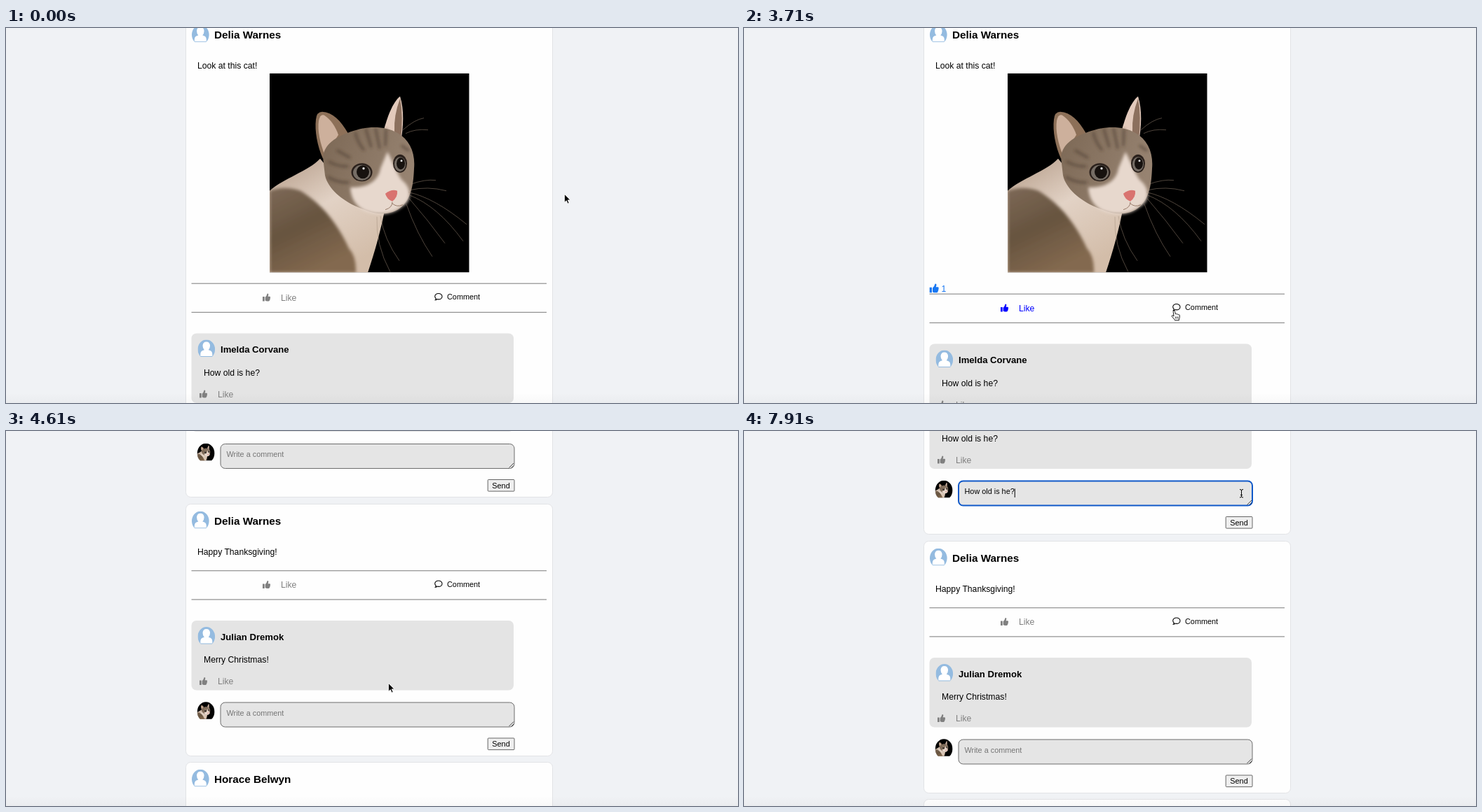
Write an HTML page that moves like this. It is 1044x536 px and loops after 8000 ms.

```html
<!DOCTYPE html>
<html lang="en">
<head>
<meta charset="utf-8">
<title>Post feed</title>
<style>
  html, body { margin: 0; width: 100%; height: 100%; overflow: hidden; background: #f0f2f5; }
  svg { display: block; font: 12.2px "Liberation Sans", Arial, sans-serif; }
  .card { fill: #fefefe; stroke: #e2e3e6; }
  .title { font-size: 15.26px; font-weight: bold; }
  .author { font-size: 13.1px; font-weight: bold; }
  .small { font-size: 10.87px; }
  .muted { fill: #808080; }
  .hint { fill: #757575; }
  .rule { fill: #8f8f8f; }
  .field { fill: #e5e5e5; stroke: #6c6c6c; }
  .line { fill: none; stroke: #000; }
  .liked { fill: #00f; }
  text { white-space: pre; }
</style>
</head>
<body>
<svg width="1044" height="536" viewBox="0 0 1044 536">
  <defs>
    <linearGradient id="shade" x2="0" y2="1">
      <stop stop-opacity="0"/><stop offset="1" stop-opacity=".025"/>
    </linearGradient>
    <linearGradient id="coat" x2=".5" y2="1">
      <stop stop-color="#7d6957"/><stop offset=".5" stop-color="#67543f"/><stop offset="1" stop-color="#83694f"/>
    </linearGradient>
    <linearGradient id="chest" x2=".6" y2="1">
      <stop stop-color="#b39a86"/><stop offset=".5" stop-color="#e2d2c5"/><stop offset="1" stop-color="#d3bda9"/>
    </linearGradient>
    <linearGradient id="face" x2="1" y2=".4">
      <stop stop-color="#7c6855"/><stop offset="1" stop-color="#978371"/>
    </linearGradient>
    <filter id="soft"><feGaussianBlur stdDeviation="2"/></filter>
    <clipPath id="frame"><path d="M0 0H284.5V284.5H0Z"/></clipPath>
    <clipPath id="round"><path d="M4.2 24.5A12.3 14 0 1 1 20.4 24.5Z"/></clipPath>

    <g id="cat" clip-path="url(#frame)">
      <path d="M0 0H285V285H0Z"/>
      <path fill="url(#chest)" d="M0 168C20 150 55 140 72 122L95 150L165 190C160 220 150 255 140 285H0Z"/>
      <path fill="url(#coat)" d="M0 168Q22 160 44 168C80 190 100 222 113 250Q124 262 123 285H0Z" filter="url(#soft)"/>
      <path fill="#8d7058" d="M76 122C68 104 64 82 66 66Q67 55 75 55C90 56 101 67 112 86Z"/>
      <path fill="#cdb09c" d="M79 118C72 100 68 82 70 68Q72 58 78 60C87 66 94 76 98 88Z"/>
      <path fill="#e3cabc" d="M162 84C168 62 175 42 186 33C192 52 191 76 187 98Z"/>
      <path fill="#8c705e" d="M178 83Q177 60 186 36Q191 60 187 95Z"/>
      <path fill="url(#face)" d="M76 120C78 99 99 88 124 81C144 75 166 76 182 85C200 95 208 114 206 136C205 158 203 176 189 190C174 204 152 202 138 196C110 187 84 168 79 146Z"/>
      <g filter="url(#soft)">
        <path fill="#e7d8cd" d="M168 112C177 129 182 145 189 153C204 165 202 184 189 190C174 204 150 203 134 196Q116 185 115 163C138 164 155 155 158 136Z"/>
        <path fill="none" stroke="#46362a" stroke-width="3" opacity=".65" d="M122 84Q125 99 135 110M137 79L145 106M151 78L157 108M166 79L165 104M84 126Q98 134 112 133M83 148Q97 157 113 156M96 110L115 121M188 103L199 111"/>
      </g>
      <ellipse cx="131.5" cy="141.5" rx="15" ry="13" fill="#2b211c"/>
      <ellipse cx="131.5" cy="142" rx="12.5" ry="11" fill="#766e66"/>
      <ellipse cx="133" cy="141" rx="9" ry="9.5" fill="#17120f"/>
      <ellipse cx="186" cy="129" rx="10" ry="13" fill="#2b211c"/>
      <ellipse cx="186" cy="130" rx="8" ry="10.5" fill="#766e66"/>
      <ellipse cx="187" cy="129" rx="6" ry="8.5" fill="#17120f"/>
      <circle cx="134" cy="136" r="1.7" fill="#ddd"/><circle cx="188" cy="125" r="1.5" fill="#ddd"/>
      <path fill="#d9736f" d="M165 172Q174 165 182 168Q183 177 175 183Q167 180 165 172Z"/>
      <path fill="none" stroke="#967a69" d="M175 184Q175 192 165 195M175 186Q181 192 190 188"/>
      <path fill="none" stroke="#a08b79" stroke-width=".7" opacity=".7" d="M198 170Q235 178 281 216M199 174Q240 190 276 240M199 179Q226 210 250 243M195 187Q210 230 232 262M200 167Q225 161 252 168M153 205Q151 245 172 284M158 204Q163 237 185 268M190 81Q207 66 220 64M194 86Q208 79 226 81M200 159Q222 151 237 153"/>
    </g>

    <g id="user" clip-path="url(#round)">
      <path fill="#94bbe0" d="M0 0H25V25H0Z"/>
      <path fill="#fff" d="M3.8 23.6V20.5Q4 15.6 9.3 14.8Q7 12.3 7 8.6Q7.3 3 12.3 3T17.6 8.6Q17.6 12.3 15.3 14.8Q20.6 15.6 20.8 20.5V23.6Z"/>
    </g>
    <g id="me" clip-path="url(#round)"><use href="#cat" transform="translate(-.8 -.3) scale(.093)"/></g>
    <path id="thumb" d="M0 5H3V12H0ZM4 5.6Q6.4 3.8 6.8 1.2Q7 0 8 .1Q9.4 .4 9 2.3L8.3 4.5H11Q12.2 4.7 12 6Q11.8 9.2 10.6 11.2Q10.2 12 9.2 12H7Q5.5 12 4 10.9Z"/>
    <path id="bubble" class="line" stroke-width="1.1" d="M1.4 10Q2.4 9 2.3 8Q.7 6.7 .7 5C.7 2.5 3 .8 5.8 .8S11 2.5 11 5S8.7 9.2 5.8 9.2Q4.9 9.2 4.1 8.9Q3 9.9 1.4 10Z"/>

    <path id="arrow" stroke="#fff" stroke-width=".8" d="M0 0V11.7L2.7 9.2L4.7 13.6L6.6 12.7L4.7 8.4H8.3Z"/>
    <g id="hand" stroke="#000" stroke-width=".9" stroke-linejoin="round">
      <path fill="#fff" d="M3.7 8.6L2.9 2Q2.9 .6 4 .6Q5.2 .6 5.4 2L6 5.3Q7.2 4.5 8 5.6Q9.3 5 10 6.2Q11.7 5.8 12 7.2V9.8Q12 11.2 11.1 12.6V14.3H5.2Q4.7 12.8 3.3 11.5L.9 8.8Q.4 7.8 1.4 7.4Q2.5 7.2 3.7 8.6Z"/>
      <path d="M6.2 9V12M8 9V12M9.8 9V12" stroke-width=".7"/>
    </g>
    <path id="beam" class="line" d="M1 .5Q3.5 .5 3.5 2Q3.5 .5 6 .5M3.5 2V11M1 12Q3.5 12 3.5 10.5Q3.5 12 6 12M2 8.5H5"/>
  </defs>

  <g id="page"></g>
  <rect y="522" width="1044" height="14" fill="url(#shade)"/>
  <use id="cursor"/>
</svg>
<script>
const $ = id => document.getElementById(id);
const text = (x, y, str, cls = '', attrs = '') => `<text x="${x}" y="${y}" class="${cls}" ${attrs}>${str}</text>`;
const use = (id, x, y, scale = 1) => `<use href="#${id}" transform="translate(${x} ${y}) scale(${scale})"/>`;
const rect = (x, y, w, h, attrs) => `<rect x="${x}" y="${y}" width="${w}" height="${h}" ${attrs}/>`;

const card = (y, h) => rect(256.5, y + .5, 523, h, 'rx="7" class="card"');
const header = (y, name, message) =>
  use('user', 265, y + 10.7) + text(297, y + 30, name, 'title') + text(273, y + 73, message);

// Everything from the first rule of a post down to its Send button
function actions(y, author, comment, id = '') {
  const box = y + 72.5, rule = dy => rect(264.5, y + dy, 506.5, 1.2, 'class="rule"');
  return rule(.6) + rule(41.8) +
    `<g class="muted" id="${id}like">${use('thumb', 366, y + 15.5, .92)}${text(392, y + 25.5, 'Like')}</g>` +
    use('bubble', 611, y + 14.7) + text(629, y + 24.3, 'Comment', 'small') +
    rect(264.5, box, 459.5, 99.5, 'rx="7" fill="#e4e4e4"') +
    use('user', 273.5, box + 9) + text(306, box + 27.6, author, 'author') + text(282, box + 60.3, comment) +
    `<g class="muted">${use('thumb', 276, box + 81, .92)}${text(302, box + 91.2, 'Like')}</g>` +
    use('me', 272.8, box + 116.3) +
    rect(306, box + 117, 419, 35, `rx="6.5" class="field" id="${id}field"`) +
    `<path class="line" stroke-width=".7" d="M717.5 ${box + 151}l6.5-6.5M721 ${box + 151}l3-3"/>` +
    text(314.5, box + 135.6, 'Write a comment', 'small hint', `id="${id}entry"`) +
    rect(687.2, box + 168, 37.8, 16.6, 'rx="1" fill="#efefef" stroke="#666"') +
    text(706, box + 180.3, 'Send', 'small', 'text-anchor="middle"');
}

$('page').innerHTML =
  card(-15, 659) + header(-15, 'Delia Warnes', 'Look at this cat!') + use('cat', 376, 64.7) +
  `<g id="count" fill="#1877f2">${use('thumb', 264.7, 365.4, 1.08)}${text(281.5, 376.7, '1')}</g>` +
  `<g id="below">` +
    actions(364, 'Imelda Corvane', 'How old is he?', 'my-') +
    rect(314.5, 564.5, 1, 12.4, 'id="caret"') +
    card(639, 360) + header(639, 'Delia Warnes', 'Happy Thanksgiving!') +
    actions(733.5, 'Julian Dremok', 'Merry Christmas!') +
    card(1008, 360) + header(1008, 'Horace Belwyn', '') +
  `</g>`;

// Keys: tick, values..., the cursor shape last
const scrollKeys = [[0, 0], [27, 0], [28, 32], [29, 167], [30, 400], [31, 550], [33, 550], [36, 497]];
const cursorKeys = [
  [0, 796.5, 237.5, 'arrow'], [2, 796.5, 237.5, 'arrow'], [6, 570, 325, 'arrow'], [10, 398, 380, 'hand'],
  [13, 391.7, 386, 'hand'], [18, 391.7, 386, 'hand'], [19, 400, 392, 'arrow'], [22, 546, 430, 'arrow'],
  [23, 546, 430, 'arrow'], [25, 609.3, 403.5, 'hand'], [26, 628, 394, 'hand'], [30, 628, 394, 'hand'],
  [31, 545.5, 360.5, 'arrow'], [34, 545.5, 360.5, 'arrow'], [37, 513, 92.5, 'beam'], [50, 513, 92.5, 'beam'],
  [53, 706, 83, 'beam']
];

function at(keys, k) {
  const i = keys.findLastIndex(key => key[0] <= k), a = keys[i], b = keys[i + 1] || a;
  const u = a === b ? 0 : (k - a[0]) / (b[0] - a[0]);
  return a.slice(1).map((v, j) => typeof v === 'string' ? v : v + (b[j + 1] - v) * u);
}

const phrase = 'How old is he?';
const typedAt = k => k < 41 ? 0 : k < 48 ? Math.floor(1 + (k - 41) * 10 / 6 + .01) : k < 51 ? Math.min(13, k - 36) : 14;

function draw() {
  const t = performance.now() % 8000;
  const k = Math.floor(t < 2600 ? t / 147.6 : (t + 40) / 150);
  const liked = k >= 17, focused = k >= 38, typed = phrase.slice(0, typedAt(k));

  $('page').setAttribute('transform', `translate(0 ${-at(scrollKeys, k)[0]})`);
  $('below').setAttribute('transform', `translate(0 ${liked ? 15 : 0})`);
  $('count').style.display = liked ? '' : 'none';
  $('my-like').setAttribute('class', liked ? 'liked' : 'muted');

  const field = $('my-field').style, entry = $('my-entry');
  field.stroke = focused ? '#1059c9' : '';
  field.strokeWidth = focused ? 2 : 1;
  entry.textContent = typed || 'Write a comment';
  entry.setAttribute('class', typed ? 'small' : 'small hint');
  $('caret').style.display = focused ? '' : 'none';
  $('caret').setAttribute('x', 314.5 + (typed ? entry.getComputedTextLength() : 0));

  const [x, y, shape] = at(cursorKeys, k);
  $('cursor').setAttribute('href', '#' + shape);
  $('cursor').setAttribute('transform', `translate(${x} ${y})`);
  requestAnimationFrame(draw);
}
draw();
</script>
</body>
</html>
```
